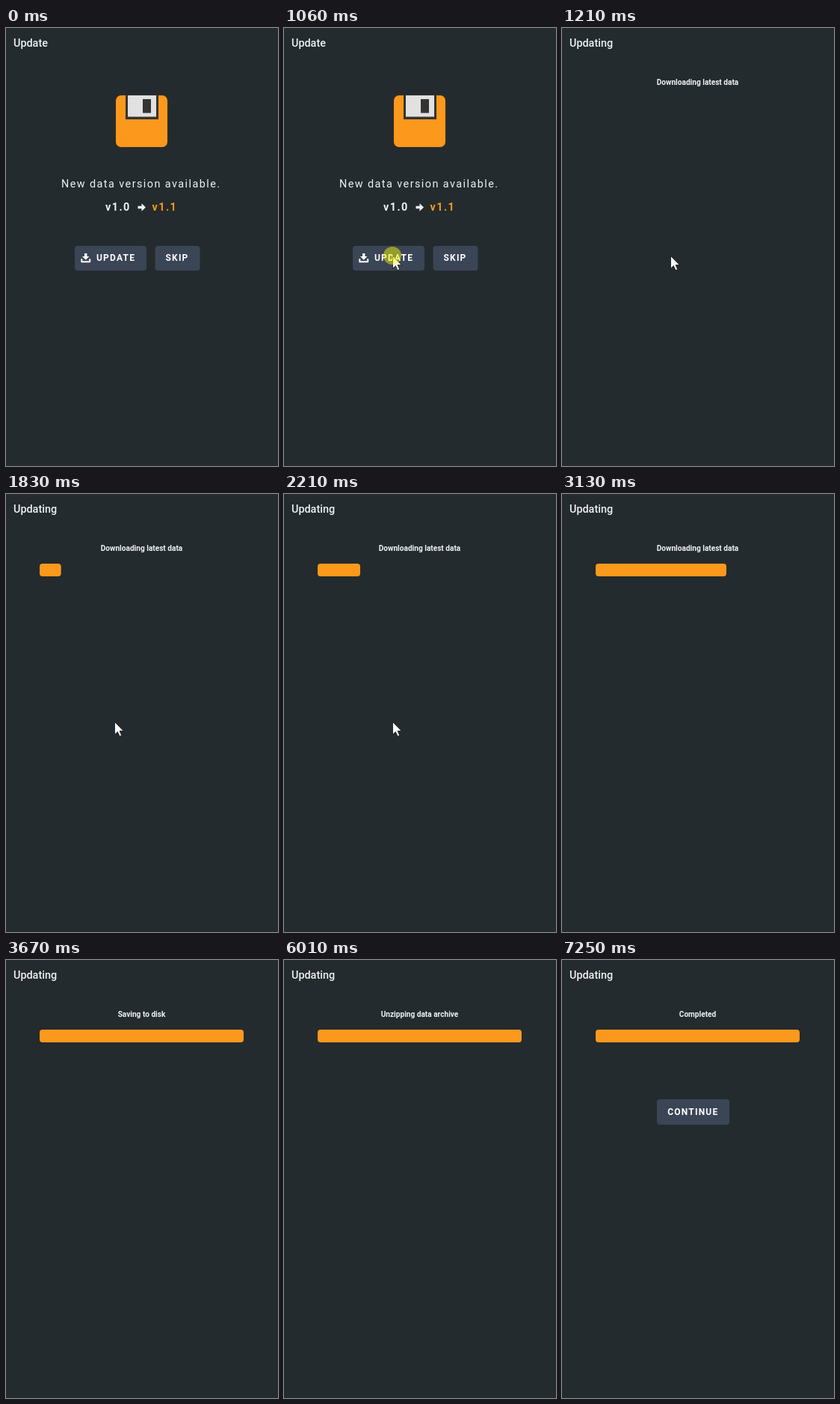
An HTML page for the animation above (8000 ms loop, 364 by 585 pixels).

```html
<!DOCTYPE html>
<html lang="en">
<head>
<meta charset="utf-8">
<title>Update</title>
<style>
  html, body { margin: 0; width: 100%; height: 100%; overflow: hidden; background: #232b2e; }
  svg { display: block; width: 364px; height: 585px; }
  text { font-family: Roboto, sans-serif; font-size: 14.4px; fill: #f0f1f1; }
  .title { font-weight: 500; }
  .status { font-size: 10.1px; font-weight: 700; text-anchor: middle; }
  .wide { letter-spacing: .1em; }
  .bold { font-weight: 700; }
  .label { font-size: 12px; font-weight: 700; letter-spacing: .1em; fill: #fff; }
  .button { fill: #3a4556; }
  .accent { fill: #fc991c; }
</style>
</head>
<body>
<svg viewBox="0 0 364 585">
  <text id="title" class="title" x="10" y="25"></text>

  <g id="prompt">
    <rect x="146" y="89" width="71" height="71" rx="8" fill="none" stroke="#2b2d2a" stroke-width="2"/>
    <rect class="accent" x="147" y="90" width="69" height="69" rx="7"/>
    <path d="M160 90h44v32h-44z" fill="#343432"/>
    <path d="M163 90h38v28.500h-38z" fill="#e1e1e1"/>
    <path d="M183 95h11v18.500h-11z" fill="#343432"/>
    <text class="wide" x="74" y="213">New data version available.</text>
    <text class="wide bold" x="133" y="244">v1.0</text>
    <path d="M176.500 237.800h5v-3.600l5.500 5.300-5.500 5.300v-3.600h-5z" fill="#f0f1f1"/>
    <text class="wide bold accent" x="195.500" y="244" style="fill:#fc991c">v1.1</text>
    <rect class="button" x="92" y="291" width="96" height="33" rx="4"/>
    <path d="M105 301h3.400v4h3l-4.700 4.700-4.700-4.700h3z" fill="#fff"/>
    <path d="M101.300 308.300v4h10.900v-4" fill="none" stroke="#fff" stroke-width="2" stroke-linejoin="round"/>
    <text class="label" x="121" y="311.300">UPDATE</text>
    <rect class="button" x="199.500" y="291" width="60" height="33" rx="4"/>
    <text class="label" x="213.500" y="311.300">SKIP</text>
  </g>

  <g id="progress">
    <text id="status" class="status" x="181.500" y="76"></text>
    <rect id="bar" class="accent" x="45" y="93" height="17" rx="4"/>
  </g>

  <g id="done">
    <rect class="button" x="127" y="186" width="97" height="34" rx="4"/>
    <text class="label" x="141.300" y="207">CONTINUE</text>
  </g>

  <g id="cursor">
    <path d="M.5.500v16.700l3.800-3.600 2.700 6 2.700-1.200-2.600-5.800h5.200z" fill="#fff" stroke="#111" stroke-width=".8"/>
    <circle id="click" r="12" fill="#ff0" fill-opacity=".47"/>
  </g>
</svg>
<script>
const LOOP = 8000;
const $ = id => document.getElementById(id);
const show = (id, on) => $(id).style.display = on ? '' : 'none';
const mix = (a, b, p) => a + (b - a) * p;

// Download progress as [tick, bar width]
const progress = [[0, 6], [9, 57], [10, 60], [21, 175], [28, 273]];

function barWidth(tick) {
  if (tick < 0) return 0;
  const i = progress.findIndex(([k]) => k > tick);
  if (i < 0) return 273;
  const [k0, w0] = progress[i - 1], [k1, w1] = progress[i];
  return mix(w0, w1, (tick - k0) / (k1 - k0));
}

function cursorAt(t, tick) {
  if (t < 70 || tick > 12) return null;
  if (tick > 10) {
    const p = (tick - 10) / 2;
    return [mix(145, 19, p), mix(304, 328, p)];
  }
  const left = 1 - Math.min(4, Math.floor((t - 70) / 70)) / 4;
  const p = 1 - left ** 2;
  return [mix(269, 145, p), mix(561, 304, p)];
}

function statusAt(t) {
  if (t < 3665) return 'Downloading latest data';
  if (t < 6010) return 'Saving to disk';
  if (t < 7250) return 'Unzipping data archive';
  return 'Completed';
}

function render(t) {
  const tick = Math.floor((t - 1516.6) / (230 / 3));
  const updating = t >= 1210;
  $('title').textContent = updating ? 'Updating' : 'Update';
  $('status').textContent = statusAt(t);
  $('bar').setAttribute('width', barWidth(tick));
  show('prompt', !updating);
  show('progress', updating);
  show('done', t >= 7250);

  const pos = cursorAt(t, tick);
  show('cursor', pos);
  if (pos) $('cursor').setAttribute('transform', `translate(${pos})`);
  show('click', t >= 1060 && !updating);
}

const start = performance.now();
function frame() {
  render((performance.now() - start) % LOOP);
  requestAnimationFrame(frame);
}
frame();
</script>
</body>
</html>
```
